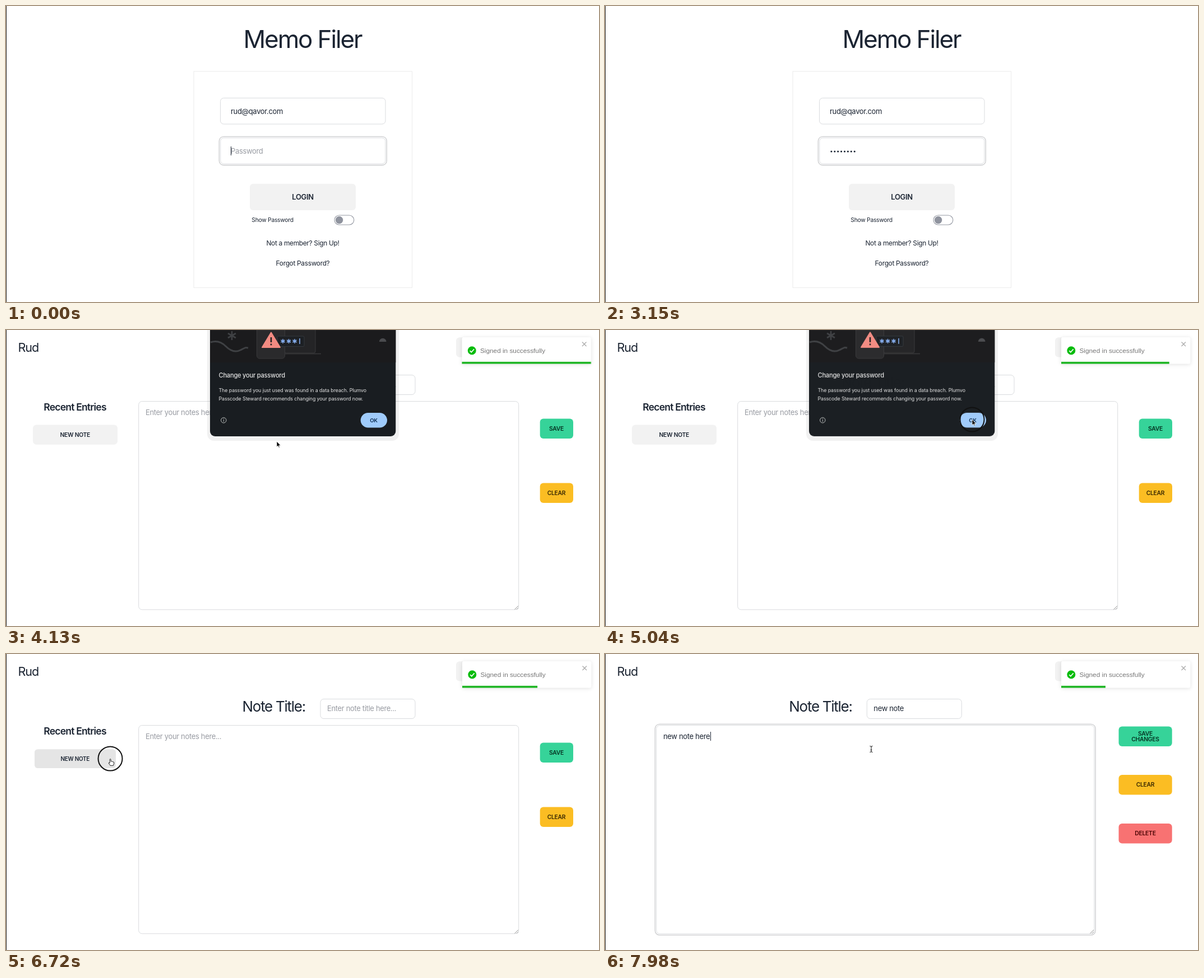
An HTML page for the animation above (8000 ms loop, 1058 px wide and 529 px high).

```html
<!DOCTYPE html>
<html lang="en">
<head>
<meta charset="utf-8">
<title>Notes app</title>
<style>
  html, body { margin: 0; width: 100%; height: 100%; overflow: hidden; background: #fff; }
  main { position: absolute; left: 0; top: 0; width: 100%; height: 100%; overflow: hidden; contain: strict; }
  svg { position: absolute; left: 0; top: 0; width: 1058px; height: 529px; overflow: hidden; }
  text { font: 13px Inter, sans-serif; font-optical-sizing: none; letter-spacing: -.026em; fill: #1b2432; white-space: pre; }
  .mid { text-anchor: middle; }
  .hint { fill: #989ba2; }
  .h1 { font-size: 44px; letter-spacing: -.048em; }
  .h2 { font-size: 26px; letter-spacing: -.049em; }
  .h3 { font-size: 17.5px; font-weight: 600; letter-spacing: -.045em; }
  .user { font-size: 21.5px; letter-spacing: -.05em; }
  .link { font-size: 11.9px; }
  .small { font-size: 10.33px; }
  .btn { font-size: 10.33px; font-weight: 600; text-anchor: middle; }
  .big { font-size: 13px; }
  .field { fill: #fff; stroke: #d9dbde; }
  .ring { fill: #fff; stroke: #cbccce; stroke-width: 1.3; }
  .grey { fill: #f2f2f2; }
  .green { fill: #36d399; }
  .amber { fill: #fbbd23; }
  .red { fill: #f87272; }
  .on-green { fill: #053322; }
  .on-amber { fill: #382800; }
  .on-red { fill: #470000; }
  .grip { stroke: #777; stroke-width: .8; fill: none; }

  /* every animation shares one 8 s clock */
  .a { animation: 8s linear infinite; }
  .step { animation: 8s step-end infinite; }

  .login { animation-name: login; }
  @keyframes login { 0% { visibility: visible } 43.75%, 100% { visibility: hidden } }
  .app { animation-name: app; }
  @keyframes app { 0% { visibility: hidden } 43.75%, 100% { visibility: visible } }
  .notes { animation-name: notes; }
  @keyframes notes { 0% { visibility: hidden } 43.75% { visibility: visible } 85.75%, 100% { visibility: hidden } }
  .editor { animation-name: editor; }
  @keyframes editor { 0% { visibility: hidden } 85.75%, 100% { visibility: visible } }

  .place { animation-name: place; }
  @keyframes place { 0% { opacity: 1 } 7% { opacity: 0 } 14% { opacity: 1 } 16.625%, 100% { opacity: 0 } }
  .cover { animation-name: type; }
  @keyframes type {
    0% { transform: translateX(0) } 7% { transform: translateX(5.9px) }
    14% { transform: translateX(0) } 16.625% { transform: translateX(5.9px) }
    18.375% { transform: translateX(11.8px) } 21% { transform: translateX(17.7px) }
    22.75% { transform: translateX(23.6px) } 26.25% { transform: translateX(29.5px) }
    27.125% { transform: translateX(35.4px) } 30.625% { transform: translateX(41.3px) }
    32.375%, 100% { transform: translateX(47.2px) }
  }
  .caret { animation-name: blink; }
  @keyframes blink {
    0% { opacity: 1 } 5.25% { opacity: 0 } 7% { opacity: 1 } 13.125% { opacity: 0 }
    14% { opacity: 1 } 39.375%, 100% { opacity: 0 }
  }

  .press { transform-origin: 123.5px 187px; animation-name: press; }
  @keyframes press { 0% { transform: none } 83.125% { transform: scale(.962) } 84.875%, 100% { transform: none } }
  .hover { animation-name: hover; }
  @keyframes hover { 0% { fill: #f2f2f2 } 82.25%, 100% { fill: #e5e5e5 } }
  .focus { animation-name: focus; }
  @keyframes focus { 0% { opacity: 0 } 93.625%, 100% { opacity: 1 } }

  .dialog { transform-origin: 529.5px 190px; animation-name: dialog; }
  @keyframes dialog {
    0%, 49.9% { opacity: 0; transform: translateY(-14px) perspective(900px) rotateX(15deg) scaleY(1.1) }
    51.4%, 63% { opacity: 1; transform: translateY(0) perspective(900px) rotateX(0deg) scaleY(1) }
    64.75% { opacity: .06; transform: translateY(-14px) perspective(900px) rotateX(15deg) scaleY(1.1) }
    65.4%, 100% { opacity: 0; transform: translateY(-16px) perspective(900px) rotateX(17deg) scaleY(1.1) }
  }
  .dialog text { fill: #e3e3e3; }
  .dialog .btn { font-size: 9.6px; fill: #0b2d52; }
  .dialog .head { font-size: 11.1px; font-weight: 500; letter-spacing: -.02em; }
  .dialog .body { font-size: 8.9px; letter-spacing: -.012em; }

  .toast { animation-name: toast; animation-timing-function: cubic-bezier(.215, .61, .355, 1); }
  @keyframes toast {
    0%, 43.35% { transform: translateX(2214px) }
    48.6% { transform: translateX(-18.5px) }
    49.91% { transform: translateX(7.4px) }
    51.225% { transform: translateX(-3.7px) }
    52.1%, 100% { transform: translateX(0) }
  }
  .toast text { font: 11.8px "Liberation Sans", Arial, sans-serif; letter-spacing: 0; fill: #757575; }
  .shade { filter: drop-shadow(0 1px 3.5px rgba(0, 0, 0, .12)); }
  .bar { transform-origin: 814px 0; animation-name: bar; }
  @keyframes bar {
    0%, 52.8% { transform: scaleX(1) } 64.75% { transform: scaleX(.809) }
    68.75%, 72% { transform: scaleX(.761) } 84% { transform: scaleX(.583) }
    99.75% { transform: scaleX(.343) } 100% { transform: scaleX(.339) }
  }

  .pointer { animation-name: move; }
  @keyframes move {
    0%, 50.75% { transform: translate(478px, 206px) }
    51.625%, 54.25% { transform: translate(483px, 199px) }
    56% { transform: translate(520px, 203px) }
    61.25%, 71.75% { transform: translate(655px, 160px) }
    73.5% { transform: translate(635px, 75px) }
    75.25% { transform: translate(560px, 47px) }
    80.5% { transform: translate(196px, 185px) }
    81.375%, 86.625% { transform: translate(186px, 187px); animation-timing-function: ease-in-out }
    92.75%, 100% { transform: translate(475px, 170px) }
  }
  .arrow { animation-name: arrow; }
  @keyframes arrow {
    0% { opacity: 0 } 50.75% { opacity: 1 } 71.75% { opacity: 0 }
    73.5% { opacity: 1 } 80.5%, 100% { opacity: 0 }
  }
  .hand { animation-name: hand; }
  @keyframes hand { 0% { opacity: 0 } 80.5% { opacity: 1 } 86.625%, 100% { opacity: 0 } }
  .beam { animation-name: beam; }
  @keyframes beam { 0% { opacity: 0 } 71.75% { opacity: 1 } 73.5% { opacity: 0 } 86.625%, 100% { opacity: 1 } }
  .click { animation-name: click; }
  @keyframes click {
    0% { opacity: 0 } 62.125% { opacity: 1 } 63.875% { opacity: 0 }
    83.125% { opacity: 1 } 85.75% { opacity: 0 }
    93.625% { opacity: 1 } 95.375%, 100% { opacity: 0 }
  }
</style>
</head>
<body>
<main>

<svg viewBox="0 0 1058 529">
  <g class="login step">
    <text class="h1 mid" x="529" y="75">Memo Filer</text>
    <rect x="335" y="116.8" width="389.5" height="386.5" fill="#fff" stroke="#ececec"/>
    <rect class="field" x="382.5" y="164.5" width="294.5" height="46.5" rx="6"/>
    <text x="401" y="193">rud@qavor.com</text>

    <rect class="ring" x="380.3" y="233.3" width="299" height="51.2" rx="8"/>
    <rect class="field" x="382.7" y="235.7" width="294.2" height="46.4" rx="6"/>
    <g fill="#1b2432">
      <circle cx="403.9" cy="260" r="1.6"/><circle cx="409.8" cy="260" r="1.6"/>
      <circle cx="415.7" cy="260" r="1.6"/><circle cx="421.6" cy="260" r="1.6"/>
      <circle cx="427.5" cy="260" r="1.6"/><circle cx="433.4" cy="260" r="1.6"/>
      <circle cx="439.3" cy="260" r="1.6"/><circle cx="445.2" cy="260" r="1.6"/>
    </g>
    <g class="cover step">
      <rect x="401" y="250" width="60" height="18" fill="#fff"/>
    </g>
    <text class="hint place step" x="401" y="263.8">Password</text>
    <g class="cover step">
      <rect class="caret step" x="401" y="251" width="1" height="16" fill="#1b2432"/>
    </g>

    <rect class="grey" x="435" y="317.7" width="189" height="47.2" rx="6"/>
    <text class="btn big" x="529.5" y="345.7">LOGIN</text>
    <text class="small" x="438.3" y="386">Show Password</text>
    <rect x="586" y="374" width="34.8" height="17" rx="8.5" fill="#fff" stroke="#9498a2" stroke-width="1.1"/>
    <circle cx="594.6" cy="382.5" r="6.7" fill="#8f939e"/>
    <text class="link mid" x="529.5" y="428">Not a member? Sign Up!</text>
    <text class="link mid" x="529.5" y="463.5">Forgot Password?</text>
  </g>

  <g class="app step">
    <text class="user" x="21.5" y="39.4">Rud</text>
    <rect class="grey" x="803" y="13.2" width="56" height="35.3" rx="6"/>
    <text class="btn" x="831" y="34.7">HOME</text>
  </g>

  <g class="notes step">
    <text class="h2" x="421.5" y="102.5">Note Title:</text>
    <rect class="field" x="561" y="80.5" width="169" height="35" rx="6"/>
    <text class="hint" x="573" y="102.4">Enter note title here...</text>
    <text class="h3 mid" x="123" y="144">Recent Entries</text>
    <g class="press step">
      <rect class="hover step" x="48" y="169.5" width="151" height="35.3" rx="6"/>
      <text class="btn" x="123.3" y="191">NEW NOTE</text>
    </g>
    <rect class="field" x="236.7" y="127.5" width="678" height="372.3" rx="6"/>
    <path class="grip" d="M907.5 499.5l6.5-6.5M911 499.5l3-3"/>
    <text class="hint" x="249" y="151.7">Enter your notes here...</text>
    <rect class="green" x="952.7" y="158.5" width="59.3" height="35.5" rx="6"/>
    <text class="btn on-green" x="982" y="180">SAVE</text>
    <rect class="amber" x="952.7" y="273.5" width="59.3" height="35.5" rx="6"/>
    <text class="btn on-amber" x="982" y="295">CLEAR</text>
  </g>

  <g class="editor step">
    <text class="h2" x="328.3" y="102.5">Note Title:</text>
    <rect class="field" x="467.3" y="80.5" width="169" height="35" rx="6"/>
    <text x="479.3" y="102.4">new note</text>
    <rect class="ring focus step" x="89.3" y="125.3" width="785.8" height="377" rx="8"/>
    <rect class="field" x="91.7" y="127.5" width="781.2" height="372.5" rx="6"/>
    <path class="grip" d="M865.5 499.5l6.5-6.5M869 499.5l3-3"/>
    <text x="104" y="151.7">new note here</text>
    <rect class="focus step" x="188" y="139" width="1" height="16" fill="#1b2432"/>
    <rect class="green" x="916.5" y="129.5" width="95.2" height="35.5" rx="6"/>
    <text class="btn on-green" x="964" y="146">SAVE</text>
    <text class="btn on-green" x="964" y="156.3">CHANGES</text>
    <rect class="amber" x="916.5" y="216" width="95.2" height="35.5" rx="6"/>
    <text class="btn on-amber" x="964" y="237.4">CLEAR</text>
    <rect class="red" x="916.5" y="303" width="95.2" height="35.5" rx="6"/>
    <text class="btn on-red" x="964" y="324.4">DELETE</text>
  </g>

  <rect width="1" height="529" fill="#222"/>
</svg>

<svg class="dialog a" viewBox="0 0 1058 529">
  <rect x="359" y="-80" width="342" height="278" rx="12" fill="#000" opacity=".055"/>
  <rect x="364" y="-80" width="331.3" height="270" rx="9" fill="#191d21"/>
  <rect x="364" y="-60" width="331.3" height="118" fill="#1b1b1d"/>
  <g fill="none" stroke="#3f4144" stroke-width="3">
    <path d="M365 22c12-4 20 0 27 7s16 12 26 7 9-5 14-4"/>
    <path d="M403 2v16M396 6l14 8M410 6l-14 8" stroke-width="2.6"/>
  </g>
  <rect x="497" y="-20" width="55" height="61" rx="3" fill="#242426" stroke="#39393b"/>
  <path d="M498 42.5h64" stroke="#39393b" stroke-width="1.5"/>
  <rect x="447.5" y="-30" width="50" height="81" rx="5" fill="#2a2a2c" stroke="#39393b"/>
  <path d="M666 21a6.2 6.2 0 0 1 12.4 0z" fill="#4a4b4e"/>
  <rect x="484" y="11" width="48" height="18.5" rx="2" fill="#1d2024" stroke="#34383d"/>
  <g stroke="#8ab4f8" stroke-width="1.5">
    <path id="star" d="M494 16v8M490.5 18l7 4M497.5 18l-7 4"/>
    <use href="#star" x="10.5"/><use href="#star" x="21"/>
    <path d="M524 15v10"/>
  </g>
  <path d="M473 4.5L489 31H457Z" fill="#f28b82" stroke="#f28b82" stroke-width="2" stroke-linejoin="round"/>
  <path d="M473 13v9M473 24.5v2.8" stroke="#222" stroke-width="2.6"/>
  <text class="head" x="379.5" y="84.8">Change your password</text>
  <text class="body" x="379.5" y="111">The password you just used was found in a data breach. Plumvo</text>
  <text class="body" x="379.5" y="126">Passcode Steward recommends changing your password now.</text>
  <circle cx="388.3" cy="161.3" r="4.7" fill="none" stroke="#c4c7c5"/>
  <path d="M388.3 160.5v3.3M388.3 158.3v1.2" stroke="#c4c7c5"/>
  <rect x="632.7" y="148" width="47.3" height="26.5" rx="13.25" fill="#9fcbfb"/>
  <text class="btn" x="656" y="165">OK</text>
</svg>

<svg viewBox="0 0 1058 529">
  <g class="toast a" style="animation-timing-function: cubic-bezier(.215, .61, .355, 1)">
    <rect class="shade" x="814" y="13" width="230.3" height="47.5" rx="3" fill="#fff"/>
    <circle cx="831.8" cy="36.8" r="7.5" fill="#07bc0c"/>
    <path d="M828.2 37l2.6 2.7 4.8-5.4" fill="none" stroke="#fff" stroke-width="1.7"/>
    <text x="846.5" y="40.7">Signed in successfully</text>
    <path d="M1028.5 21.5l7.5 7.5M1036 21.5l-7.5 7.5" stroke="#aaa" stroke-width="1.3"/>
    <rect class="bar a" x="814" y="56.8" width="230.3" height="3.7" fill="#1fb524"/>
  </g>

  <g class="pointer a">
    <circle class="click step" r="21.5" fill="none" stroke="#111" stroke-width="2"/>
    <path class="arrow step" d="M0 0V10L2.3 7.9 3.8 11.3 5.3 10.7 3.9 7.4H7Z" fill="#000" stroke="#fff" stroke-width=".8"/>
    <path class="hand step" d="M-.8 8V1.2q.9-1.5 1.9 0V5q1.2-.8 2 .3 1.2-.5 1.8.5 1.5-.3 1.7 1.2V9L5.4 12.3H0L-3 8q.4-1.8 2.2 0z" fill="#fff" stroke="#111" stroke-width=".9"/>
    <path class="beam step" d="M-2.5-5.5q2.5 0 2.5 1.5 0-1.5 2.5-1.5M0-4V4M-2.5 5.5Q0 5.5 0 4 0 5.5 2.5 5.5M-1.3 1.5H1.3" fill="none" stroke="#111"/>
  </g>
</svg>

</main>
</body>
</html>
```
